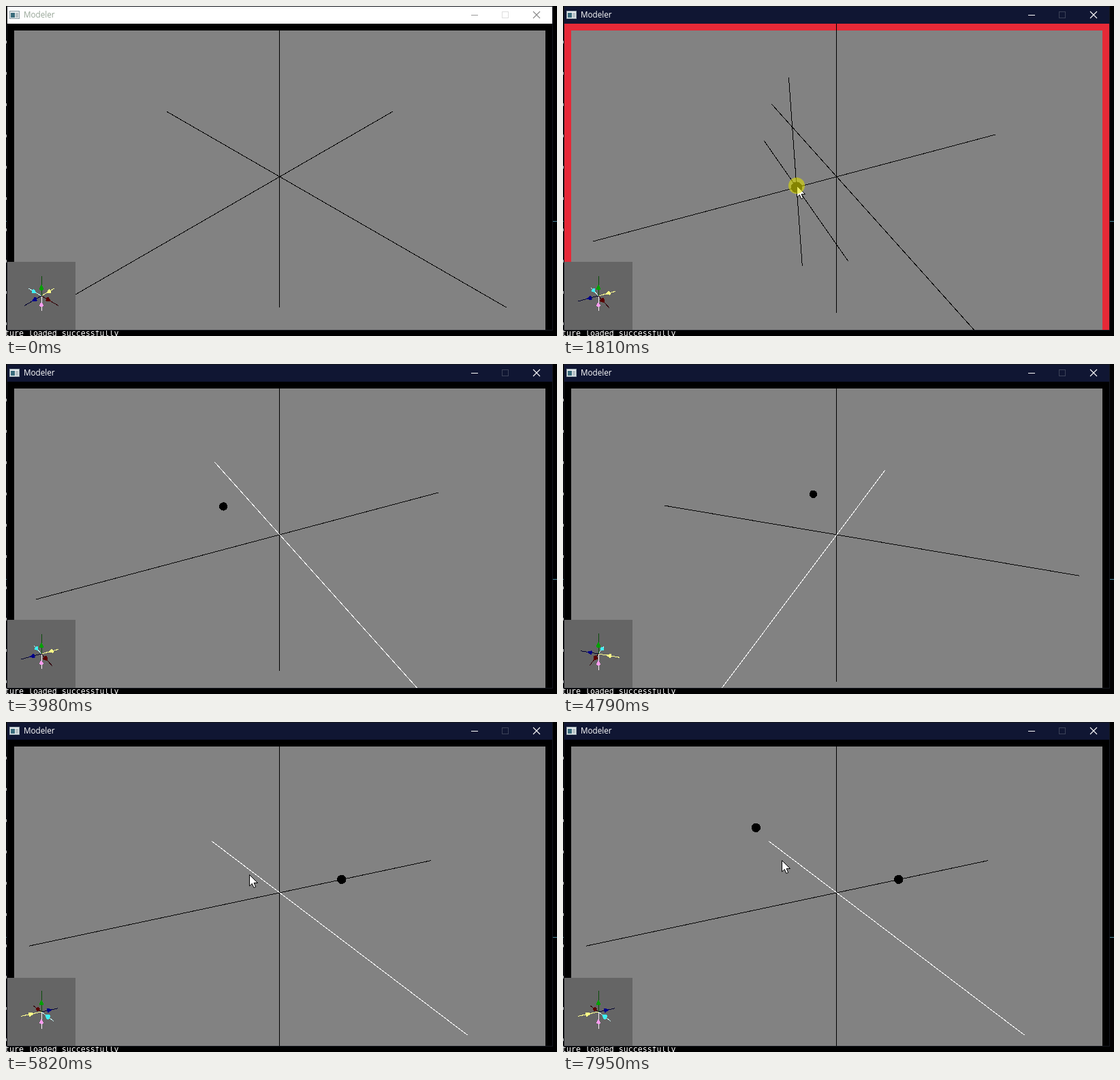
Recreate the animation shown at these times as an HTML page. Size 809x485 px, loop 8 s.

```html
<!DOCTYPE html>
<html lang="en">
<head>
<meta charset="utf-8">
<title>Modeler</title>
<style>
  html, body { margin: 0; width: 100%; height: 100%; overflow: hidden; background: #000; }
  svg { display: block; width: 809px; height: 485px; }
  .thin { fill: none; stroke: #000; stroke-width: 1; shape-rendering: crispEdges; }
</style>
</head>
<body>
<svg viewBox="0 0 809 485" width="809" height="485">
  <defs>
    <clipPath id="view"><rect x="2" y="26" width="800" height="450"/></clipPath>
  </defs>

  <rect width="809" height="485"/>
  <path id="terminal" class="thin" style="stroke:#bbb;stroke-width:4"/>
  <path d="M0 316.5H2M803 316.5H809" class="thin" style="stroke:#4b8a9c"/>
  <text x="-2" y="484.6" font-family="'DejaVu Sans Mono', monospace" font-size="11.6" fill="#fff">ture loaded successfully</text>

  <rect x="1" width="802" height="477" fill="#15181f"/>
  <rect id="titleBar" x="2" y="1" width="800" height="25"/>
  <g shape-rendering="crispEdges">
    <rect x="5.5" y="7.5" width="14" height="11" fill="#e8ecee" stroke="#8a9ca4"/>
    <rect x="7" y="10" width="6" height="7" fill="#3a6c7c"/>
    <rect x="14" y="10" width="4" height="7" fill="#b5c0c4"/>
  </g>
  <text id="title" x="26" y="17" font-family="'Open Sans', 'Noto Sans', sans-serif" font-size="11.7">Modeler</text>
  <path id="minimise" d="M683 13.5H693" class="thin"/>
  <path id="maximise" d="M728.5 8.5H737.5V17.5H728.5Z" class="thin"/>
  <path id="close" d="M774 8L784 18M784 8L774 18" fill="none" stroke-width="1.1"/>

  <g clip-path="url(#view)">
    <rect id="border" x="2" y="26" width="800" height="450"/>
    <rect x="12" y="36" width="780" height="440" fill="#828282"/>
    <path id="axes" class="thin"/>
    <path id="axisX" class="thin"/>
    <path id="grid" class="thin"/>
    <g id="balls" shape-rendering="crispEdges"></g>
    <path id="readout" fill="none" stroke="#000" stroke-width="3" stroke-linecap="square" shape-rendering="crispEdges"/>
    <rect x="2" y="376" width="100" height="100" fill="#656565"/>
    <g id="gizmo" shape-rendering="crispEdges"></g>
  </g>

  <path id="cursor" d="M0 0V16.5L3.8 13L6.4 19L9.2 17.8L6.6 12H12Z" fill="#fff" stroke="#000" stroke-width="1"/>
  <circle id="press" r="12" fill="#dcdc00" opacity=".6"/>
</svg>

<script>
const LOOP = 8000;
const FOCAL = 0.5 / Math.tan(Math.PI / 8);
const RED = '#e62937', PURPLE = '#c87aff';
const $ = id => document.getElementById(id);
const set = (el, attrs) => { for (const k in attrs) el.setAttribute(k, attrs[k]); };
const show = (el, on) => el.setAttribute('visibility', on ? 'visible' : 'hidden');
const within = (t, { from, to }) => t >= from && t < to;

// Camera azimuth and pitch in degrees.
const cameraKeys = [
  { t: 460, v: [45, 35.26] }, { t: 1210, v: [64, 33] }, { t: 4050, v: [64, 33] },
  { t: 4790, v: [109.6, 28.4] }, { t: 5230, v: [155, 13] }, { t: 5750, v: [242.1, 23.7] }
];
// The pointer moves through world space; placement snaps it to whole units.
const pointerKeys = [
  { t: 460, v: [9.14, 0, 1.64] }, { t: 1270, v: [0, 0, 0] }, { t: 1740, v: [0, 0.1, 2] },
  { t: 2750, v: [0, 0.1, 2] }, { t: 3490, v: [-2, 1.2, 2] }, { t: 5750, v: [0, 1.2, -1.5] },
  { t: 5950, v: [0, 1.2, -1.5] }, { t: 6080, v: [2, 1.2, -1.5] }, { t: 6410, v: [2, 1.2, -1.5] },
  { t: 6890, v: [2, 2.45, -2.6] }, { t: 7420, v: [2, 2.45, -2.6] },
  { t: 7600, v: [2, 3, -2.8] }, { t: 7900, v: [2, 1.3, -1.9] }
];
// A plane is chosen along one axis, then a point is placed on it.
const modes = [
  { from: 1340, to: 2750, color: RED, axis: 2 },
  { from: 2750, to: 3710, color: PURPLE, axis: 2 },
  { from: 6010, to: 6410, color: RED, axis: 0 },
  { from: 6410, to: 7640, color: PURPLE, axis: 0 }
];
const pointing = [{ from: 130, to: 460 }, { from: 1270, to: 3710 }, { from: 5750, to: LOOP }];
const presses = [130, 1810, 3570, 7500].map(from => ({ from, to: from + 140 }));

function sample(keys, t) {
  const next = keys.findIndex(k => k.t > t);
  if (next < 0) return keys[keys.length - 1].v;
  if (next === 0) return keys[0].v;
  const a = keys[next - 1], b = keys[next];
  const u = (t - a.t) / (b.t - a.t), ease = u * u * (3 - 2 * u);
  return a.v.map((v, i) => v + (b.v[i] - v) * ease);
}

// Orbit camera; returns a projector giving [x, y, depth].
function orbit([azimuth, pitch], distance, size, cx, cy) {
  const a = azimuth * Math.PI / 180, p = pitch * Math.PI / 180;
  const [sa, ca, sp, cp] = [Math.sin(a), Math.cos(a), Math.sin(p), Math.cos(p)];
  return ([x, y, z]) => {
    const toward = sa * x + ca * z;
    const depth = distance - cp * toward - sp * y;
    const k = FOCAL * size / depth;
    return [cx + k * (ca * x - sa * z), cy - k * (cp * y - sp * toward), depth];
  };
}

const pt = p => p[0].toFixed(2) + ' ' + p[1].toFixed(2);
const line = (project, a, b) => `M${pt(project(a))}L${pt(project(b))}`;
const along = (axis, v) => [0, 1, 2].map(i => i === axis ? v : 0);
const snap = v => v.map(n => Math.round(n) || 0);

// Where a mode puts its point: on the axis for a plane, anywhere on the plane after that.
function placement(mode, t) {
  const point = snap(sample(pointerKeys, t));
  return mode.color === RED ? along(mode.axis, point[mode.axis]) : point;
}

function gridPath(project, axis, offset, spacing, count) {
  const half = spacing * count / 2, [u, v] = [0, 1, 2].filter(i => i !== axis);
  const point = (a, b) => { const q = along(axis, offset); q[u] = a; q[v] = b; return q; };
  let d = '';
  for (let i = 0; i < count; i++) {
    const s = (i - (count - 1) / 2) * spacing;
    d += line(project, point(s, -half), point(s, half));
    d += line(project, point(-half, s), point(half, s));
  }
  return d;
}

// Block glyphs on a 3px cell: relative strokes, and width in cells.
const glyphs = {
  '0': ['h12v18h-12z', 5],
  '1': ['h3v18', 2],
  '2': ['h12v9h-12v9h12', 5],
  '3': ['h12v18h-12m3-9h9', 5],
  '-': ['m0 9h9', 4],
  '.': ['m0 18h.01', 1]
};
function label(text, x, y) {
  let d = '';
  for (const ch of String(text)) {
    const [strokes, cells] = glyphs[ch];
    d += `M${x + 1.5} ${y + 1.5}${strokes}`;
    x += 3 * (cells + 1);
  }
  return d;
}
const column = (values, x) => values.map((v, i) => label(v, x, 29 + 30 * i)).join('');

const arms = [
  { axis: 0, sign: 1, line: '#300008', cone: '#5a0000' },
  { axis: 0, sign: -1, line: '#c4f4f4', cone: '#40f0f4' },
  { axis: 1, sign: 1, line: '#0a4c0a', cone: '#00a000' },
  { axis: 1, sign: -1, line: '#fff0fc', cone: '#ff9cf0' },
  { axis: 2, sign: 1, line: '#000030', cone: '#000088' },
  { axis: 2, sign: -1, line: '#ffff90', cone: '#ffff88' }
];

function cone(project, { axis, sign, cone: fill }) {
  const apex = pt(project(along(axis, sign * 0.5 + 0.13)));
  const ring = Array.from({ length: 9 }, (_, i) => {
    const q = along(axis, sign * 0.5 - 0.12), a = i * Math.PI / 4;
    q[(axis + 1) % 3] = 0.11 * Math.cos(a);
    q[(axis + 2) % 3] = 0.11 * Math.sin(a);
    return pt(project(q));
  });
  const sides = ring.slice(1).map((r, i) => [apex, ring[i], r]);
  return [ring, ...sides].map(p => `<polygon fill="${fill}" points="${p.join(' ')}"/>`).join('');
}

function drawGizmo(camera) {
  const project = orbit(camera, 4, 100, 52, 426);
  const tip = arm => along(arm.axis, arm.sign);
  const depth = arm => project(tip(arm))[2];
  $('gizmo').innerHTML = [...arms].sort((a, b) => depth(b) - depth(a)).map(arm =>
    `<path class="thin" style="stroke:${arm.line}" d="${line(project, [0, 0, 0], tip(arm))}"/>` +
    cone(project, arm)).join('');
}

function drawTitle(active) {
  set($('titleBar'), { fill: active ? '#101633' : '#fff' });
  set($('title'), { fill: active ? '#fff' : '#96a596' });
  $('minimise').style.stroke = active ? '#fff' : '#999';
  $('maximise').style.stroke = active ? '#3c4258' : '#ddd';
  set($('close'), { stroke: active ? '#fff' : '#888' });
}

function drawScene(t, project) {
  const mode = modes.find(m => within(t, m));
  const fine = mode && mode.color === PURPLE;
  const point = mode && placement(mode, t);
  const axis = i => line(project, along(i, -10), along(i, 10));
  set($('border'), { fill: mode ? mode.color : '#000' });
  set($('axes'), { d: axis(1) + axis(2) });
  set($('axisX'), { d: axis(0) });
  $('axisX').style.stroke = !mode && t >= 3710 ? '#fff' : '#000';
  set($('grid'), {
    d: mode ? gridPath(project, mode.axis, point[mode.axis], fine ? 1 : 10, fine ? 9 : 1) : ''
  });
  set($('readout'), { d: fine ? column(point, 2) + column(['0.', 1, 1], 182) : '' });

  const balls = modes.filter(m => m.color === PURPLE && t >= m.to)
    .map(m => ({ at: placement(m, m.to), r: 0.2 }));
  if (mode) balls.push({ at: point, r: fine ? 0.5 : 0.25 });
  $('balls').innerHTML = balls.map(({ at, r }) => {
    const [x, y, depth] = project(at);
    return `<circle cx="${x}" cy="${y}" r="${r * FOCAL * 450 / depth}"/>`;
  }).join('');
}

function drawPointer(t, project) {
  const [x, y] = project(sample(pointerKeys, t)).map(Math.round);
  show($('cursor'), pointing.some(p => within(t, p)));
  set($('cursor'), { transform: `translate(${x + 0.5} ${y + 0.5})` });
  show($('press'), presses.some(p => within(t, p)));
  set($('press'), { cx: x, cy: y });
}

function render(t) {
  const camera = sample(cameraKeys, t);
  const project = orbit(camera, Math.sqrt(300), 450, 401.9, 250.9);
  drawTitle(t >= 460);
  drawScene(t, project);
  drawGizmo(camera);
  drawPointer(t, project);
}

let marks = '';
for (let y = 53; y < 470; y += 46) marks += `M0 ${y}H1`;
set($('terminal'), { d: marks });

const start = performance.now();
function tick() {
  render((performance.now() - start) % LOOP);
  requestAnimationFrame(tick);
}
tick();
</script>
</body>
</html>
```
